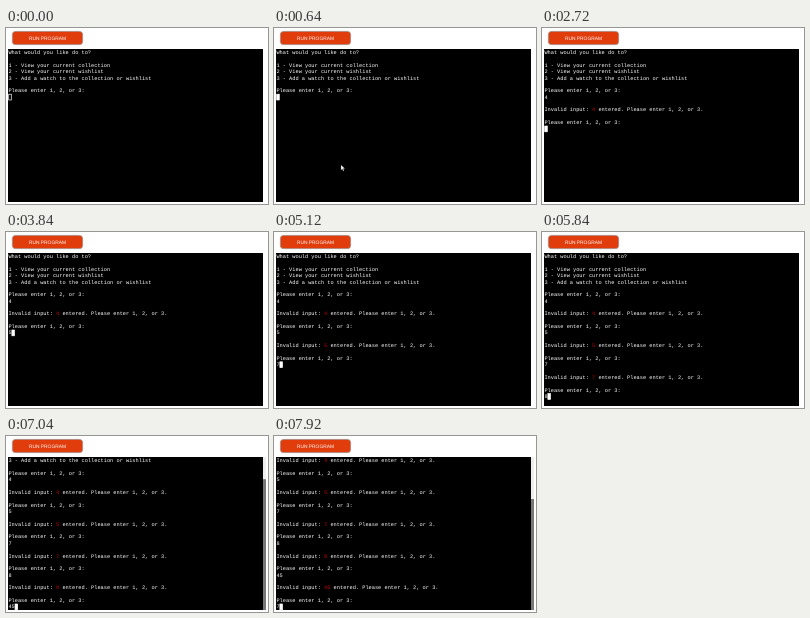
Write an HTML page that moves like this. It is 262 px wide and 176 px high and loops after 8 s.

```html
<!DOCTYPE html>
<html lang="en">
<head>
<meta charset="utf-8">
<title>Terminal session</title>
<style>
  html, body { margin: 0; width: 100%; height: 100%; overflow: hidden; background: #fff; }
  svg { display: block; width: 262px; height: 176px; }
  text { fill: #fff; text-rendering: geometricPrecision; white-space: pre; }
  #lines { font: 5.3px "Liberation Mono", monospace; }
  #lines .bad { fill: #cc0000; }
  #label { font: 4.9px "Liberation Sans", sans-serif; text-anchor: middle; }
</style>
</head>
<body>
<svg viewBox="0 0 262 176">
  <rect x="6.4" y="3.4" width="70.2" height="13.2" rx="3.2" fill="#e03c0c" stroke="#a08a80" stroke-width=".8"/>
  <text id="label" x="41.5" y="11.8">RUN PROGRAM</text>
  <rect x="2" y="21" width="255" height="153" fill="#000"/>
  <g id="bar">
    <rect x="257" y="21" width="3" height="153" fill="#eee"/>
    <rect id="thumb" x="257" width="3" fill="#777"/>
  </g>
  <g id="lines"></g>
  <rect id="caret" stroke="#fff" stroke-width=".7"/>
  <path id="pointer" d="M0 0V5L1.3 3.9L2.2 6L3.1 5.6L2.2 3.6H3.8Z" fill="#fff" stroke="#555" stroke-width=".3"/>
</svg>
<script>
const LOOP = 8000, STEP = 80;
const LEFT = 2.4, TOP = 21.4, CELL = 3.18, ROW = 6.36, ROWS = 24;
const ASK = "Please enter 1, 2, or 3";
const MENU = [
  "What would you like do to?", "",
  "1 - View your current collection",
  "2 - View your current wishlist",
  "3 - Add a watch to the collection or wishlist", "",
  ASK + ":"
];
// time and key; "\n" submits the answer
const KEYS = [
  [2320, "4"], [2720, "\n"], [3840, "5"], [4160, "\n"], [5040, "7"], [5440, "\n"],
  [5840, "8"], [6400, "\n"], [6720, "4"], [6960, "5"], [7200, "\n"], [7920, "7"]
];
const POINTER = [
  [240, 108, 164], [320, 98, 156], [400, 84, 146], [480, 67, 137],
  [800, 78, 143], [880, 88, 148]
];
const FOCUS = 640, POINTER_END = 2320, CARET_GAP = [6400, 6480];

const $ = id => document.getElementById(id);
const set = (el, attrs) => {
  for (const name in attrs) el.setAttribute(name, attrs[name]);
};
const show = (el, on) => { el.style.display = on ? "" : "none"; };
const svgEl = name => document.createElementNS("http://www.w3.org/2000/svg", name);

const rows = Array.from({ length: ROWS }, (_, i) => {
  const row = svgEl("text");
  set(row, { x: LEFT, y: TOP + i * ROW + 4.7 });
  $("lines").append(row);
  return row;
});

function session(t) {
  const lines = [...MENU];
  let input = "";
  for (const [at, key] of KEYS) {
    if (at > t) break;
    if (key === "\n") {
      lines.push(input, "", ["Invalid input: ", input, ` entered. ${ASK}.`], "", ASK + ":");
      input = "";
    } else {
      input += key;
    }
  }
  lines.push(input);
  return { lines, input };
}

function fillRow(row, line) {
  row.replaceChildren();
  if (!line) return;
  [].concat(line).forEach((part, i) => {
    const span = svgEl("tspan");
    span.textContent = part;
    if (i === 1) span.setAttribute("class", "bad");
    row.append(span);
  });
}

function draw(t) {
  const { lines, input } = session(t);
  const scroll = Math.max(0, lines.length - ROWS);
  rows.forEach((row, i) => fillRow(row, lines[i + scroll]));

  const height = ROWS * ROW, thumb = height * ROWS / lines.length;
  show($("bar"), scroll > 0);
  set($("thumb"), { y: TOP + height - thumb, height: thumb });

  show($("caret"), t < CARET_GAP[0] || t >= CARET_GAP[1]);
  set($("caret"), {
    x: LEFT + input.length * CELL + 0.3,
    y: TOP + (lines.length - 1 - scroll) * ROW + 0.3,
    width: CELL - 0.6, height: ROW - 0.6,
    fill: t < FOCUS ? "none" : "#fff"
  });

  const spot = POINTER.filter(p => p[0] <= t).pop();
  show($("pointer"), spot && t < POINTER_END);
  if (spot) set($("pointer"), { transform: `translate(${spot[1]} ${spot[2]})` });
}

const start = performance.now();
let last = -1;
function tick() {
  const t = Math.floor((performance.now() - start) % LOOP / STEP) * STEP;
  if (t !== last) draw(last = t);
  requestAnimationFrame(tick);
}
tick();
</script>
</body>
</html>
```
